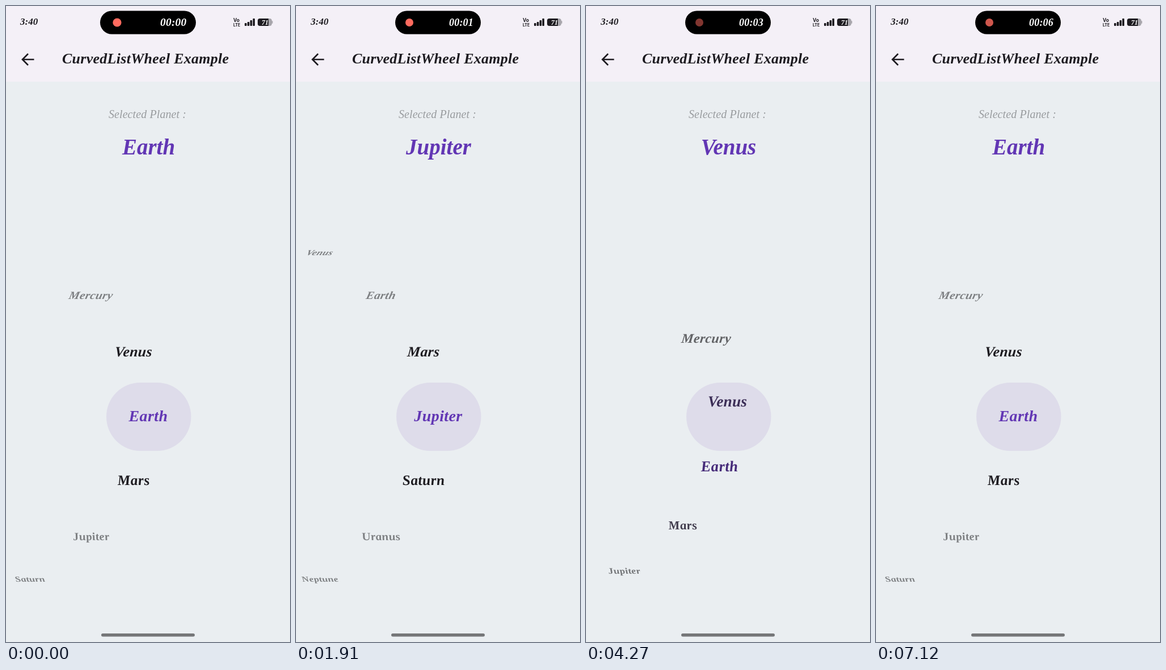
An HTML page with a canvas for the animation above (7.18 s loop, 501x1118 px).

```html
<!DOCTYPE html>
<html lang="en">
<head>
<meta charset="utf-8">
<title>Curved list wheel</title>
<style>
  html, body { margin: 0; width: 100%; height: 100%; overflow: hidden; background: #eaeef1; }
  canvas { display: block; width: 100%; height: 100%; }
</style>
</head>
<body>
<canvas id="stage" width="501" height="1118"></canvas>
<script>
const ctx = document.getElementById('stage').getContext('2d');
const LOOP = 7180;
const SERIF = '"Liberation Serif", serif';
const SANS = 'Inter, sans-serif';
const INK = '#1d1b20';
const PURPLE = '#6236b4';
const PLANETS = ['Mercury', 'Venus', 'Earth', 'Mars', 'Jupiter', 'Saturn', 'Uranus', 'Neptune'];

// Each scroll gesture: start ms, duration ms, item position reached.
const GESTURES = [
  [200, 500, 3], [1175, 410, 4], [2210, 420, 5], [2830, 490, 6],
  [3330, 460, 6.93], [3800, 900, 0.53], [4730, 400, 1], [5450, 750, 2]
];
// Brightness of the recording dot over time.
const DOT_KEYS = [[0, 1], [2640, 1], [3640, 0.5], [4180, 0.5], [5230, 1], [6700, 1], [7700, 0.5]];
// Text styles by distance from the selected item: colour and relative size.
const LEVELS = [
  { rgb: [98, 54, 180], size: 1 },
  { rgb: [29, 27, 32], size: 0.96 },
  { rgb: [126, 128, 131], size: 0.9 }
];

const clamp01 = v => Math.min(1, Math.max(0, v));
const mix = (a, b, u) => a + (b - a) * u;
const easeOut = u => 1 - (1 - u) ** 3;
const easeInOut = u => (1 - Math.cos(Math.PI * u)) / 2;

function scrollAt(t) {
  let pos = 2;
  for (const [start, duration, target] of GESTURES) {
    pos = mix(pos, target, easeOut(clamp01((t - start) / duration)));
  }
  return pos;
}

const selectedAt = t => Math.round(scrollAt(t));

function dotBrightness(t) {
  const next = DOT_KEYS.findIndex(key => key[0] > t);
  const [t0, a] = DOT_KEYS[next - 1];
  const [t1, b] = DOT_KEYS[next];
  return mix(a, b, easeInOut((t - t0) / (t1 - t0)));
}

function text(str, x, y, font, color, align = 'center', spacing = 0) {
  ctx.font = font;
  ctx.fillStyle = color;
  ctx.textAlign = align;
  ctx.letterSpacing = spacing + 'px';
  ctx.fillText(str, x, y);
}

function box(x, y, w, h, r, color) {
  ctx.fillStyle = color;
  ctx.beginPath();
  ctx.roundRect(x, y, w, h, r);
  ctx.fill();
}

// A style change takes 200 ms: average the styles over that window.
function itemStyle(index, t) {
  const samples = 10;
  const rgb = [0, 0, 0];
  let size = 0;
  for (let n = 0; n < samples; n++) {
    const distance = Math.abs(index - selectedAt(t - n * 200 / samples));
    const level = LEVELS[Math.min(2, distance)];
    level.rgb.forEach((c, i) => rgb[i] += c / samples);
    size += level.size / samples;
  }
  return { color: `rgb(${rgb.map(Math.round)})`, size };
}

function drawWheel(t) {
  box(177, 662, 149.5, 120, 60, '#dedcea');
  const pos = scrollAt(t);
  PLANETS.forEach((name, i) => {
    const k = i - pos, k2 = k * k;
    if (Math.abs(k) > 4.3) return;
    const x = 251 - k2 * (26.17 - 0.1525 * k2 - 0.0195 * k2 * k2);
    const y = 721 + k * (115.47 - 2.504 * k2 + 0.034 * k2 * k2);
    const flatten = 1 - 0.065 * k2 + 0.00147 * k2 * k2;
    const depth = 1 / (1 + 0.79 * (1 - Math.cos(0.354 * k)));
    const { color, size } = itemStyle(i, t);
    ctx.save();
    ctx.transform(depth * size, 0, 0.08 * k, flatten * size, x, y);
    text(name, 0, 9, `italic bold 28px ${SERIF}`, color, 'center', 0.4);
    ctx.restore();
  });
}

function drawStatusBar(t) {
  const shrink = easeOut(clamp01((t - 30) / 400));
  const left = mix(166, 175, shrink), right = mix(335, 326, shrink);
  const dx = 1 - shrink;

  text('3:40', 26 - dx, 33, `italic bold 17px ${SERIF}`, INK, 'left');
  box(left, 8.5, right - left, 41, 20.5, '#000');

  const glow = dotBrightness(t);
  ctx.fillStyle = `rgb(${[255, 107, 95].map(c => Math.round(c * glow))})`;
  ctx.beginPath();
  ctx.arc(mix(196, 200, shrink), 29, mix(7.6, 7, shrink), 0, 7);
  ctx.fill();

  const seconds = Math.max(0, Math.floor((t - 500) / 1000));
  text('00:0' + seconds, mix(272, 270, shrink), 35,
    `italic bold ${mix(19.5, 18, shrink)}px ${SERIF}`, '#fff', 'left', 0.2);

  ctx.save();
  ctx.translate(dx, 0);
  text('Vo', 400, 28, `bold 8.5px ${SANS}`, INK, 'left');
  text('LTE', 400, 36, `bold 7px ${SANS}`, INK, 'left');
  [5, 7, 10, 13].forEach((h, i) => box(420 + i * 4.8, 35 - h, 3.6, h, 1, INK));
  box(443, 22, 25, 13, 4, '#a9a7ad');
  box(443, 22, 19, 13, [4, 0, 0, 4], INK);
  box(468, 26, 1.5, 5, 1, '#a9a7ad');
  text('71', 456, 33, `italic bold 12px ${SERIF}`, '#fff');
  ctx.restore();
}

function drawHeader(t) {
  ctx.fillStyle = '#f4f0f7';
  ctx.fillRect(0, 0, 501, 133);
  drawStatusBar(t);

  ctx.strokeStyle = INK;
  ctx.lineWidth = 2.7;
  ctx.beginPath();
  ctx.moveTo(49.5, 94);
  ctx.lineTo(29.5, 94);
  ctx.moveTo(39, 84);
  ctx.lineTo(29, 94);
  ctx.lineTo(39, 104);
  ctx.stroke();

  text('CurvedListWheel Example', 99, 101, `italic bold 26px ${SERIF}`, INK, 'left', 0.27);
  text('Selected Planet :', 249.5, 197, `italic 20px ${SERIF}`, '#999c9f', 'center', 0.1);
  text(PLANETS[selectedAt(t)], 251.5, 261, `italic bold 39px ${SERIF}`, PURPLE);
}

function draw(now) {
  const t = now % LOOP;
  ctx.fillStyle = '#eaeef1';
  ctx.fillRect(0, 0, 501, 1118);
  drawHeader(t);
  drawWheel(t);
  box(168, 1103, 165, 5.5, 2.75, '#757678');
  requestAnimationFrame(() => draw(performance.now() - startTime));
}

const startTime = performance.now();
draw(0);
</script>
</body>
</html>
```
